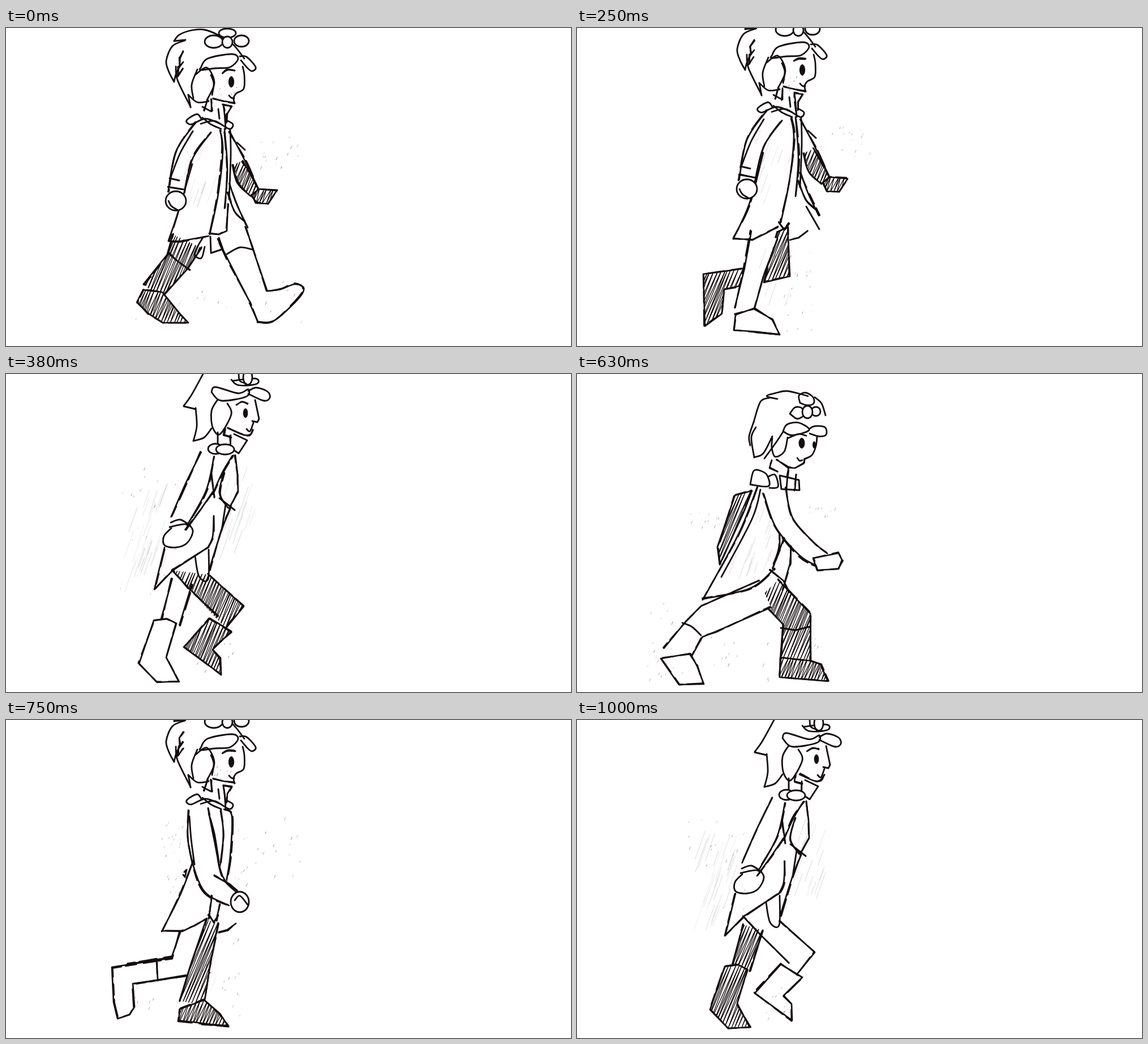
Animation, 998 px wide and 561 px high, one loop 1040 ms. Source, as an HTML page:

```html
<!DOCTYPE html>
<html lang="en">
<head>
<meta charset="utf-8">
<title>Walk cycle sketch</title>
<style>
html, body { margin: 0; width: 100%; height: 100%; overflow: hidden; background: #fff; }
svg { display: block; width: 100vw; height: 100vh; }
path { fill: none; stroke: #140d0e; stroke-linecap: round; stroke-linejoin: round; }
</style>
</head>
<body>
<svg id="stage" viewBox="0 0 998 561"></svg>
<script>
const stage = document.getElementById('stage');
const LOOP = 1040;
let layer, clips = 0, seed = 7;

const rnd = () => (seed = (seed * 16807) % 2147483647) / 2147483647;
const jit = a => (rnd() - .5) * 2 * a;

function add(parent, tag, attrs) {
  const el = document.createElementNS('http://www.w3.org/2000/svg', tag);
  for (const k in attrs) el.setAttribute(k, attrs[k]);
  return parent.appendChild(el);
}

const pairs = n => n.reduce((p, v, i) => (i % 2 ? p[p.length - 1].push(v) : p.push([v]), p), []);
const straight = p => 'M' + p.map(q => q.map(v => v.toFixed(1)).join(' ')).join('L');

function smooth(p) {
  let d = 'M' + p[0];
  for (let i = 0; i < p.length - 1; i++) {
    const a = p[i - 1] || p[i], b = p[i], c = p[i + 1], e = p[i + 2] || c;
    const h1 = b.map((v, k) => v + (c[k] - a[k]) / 6);
    const h2 = c.map((v, k) => v - (e[k] - b[k]) / 6);
    d += `C${h1} ${h2} ${c}`;
  }
  return d;
}

const pen = (d, w, more) => add(layer, 'path', { d, 'stroke-width': w, ...more });
const blank = p => pen(straight(p) + 'Z', 0, { style: 'fill:#fff;stroke:none' });

// a firm line with a broken second pass beside it
function sketch(make, p) {
  pen(make(p), 2.7);
  const beside = p.map(q => q.map(v => v + jit(1.7)));
  pen(make(beside), 2.8, { 'stroke-dasharray': '19 8 31 13', 'stroke-dashoffset': rnd() * 40 });
}

const c = (...n) => pen(smooth(pairs(n)), 2.8);
const l = (...n) => pen(straight(pairs(n)), 2.9);
const bc = (...n) => sketch(smooth, pairs(n));
const bl = (...n) => sketch(straight, pairs(n));

const oval = (x, y, rx, ry) => `M${x - rx} ${y}a${rx} ${ry} 0 1 1 ${2 * rx} 0a${rx} ${ry} 0 1 1 ${-2 * rx} 0`;
const ring = (...n) => pen(oval(...n), 2.8, { style: 'fill:#fff' });
const dot = (...n) => pen(oval(...n), 1, { style: 'fill:#140d0e' });

function hatch(p) {
  const id = 'clip' + clips++, lean = .42;
  add(add(layer, 'clipPath', { id }), 'path', { d: straight(p) + 'Z' });
  const xs = p.map(q => q[0]), ys = p.map(q => q[1]);
  const top = Math.min(...ys), low = Math.max(...ys), run = (low - top) * lean;
  const zig = [];
  for (let x = Math.min(...xs) - run; x < Math.max(...xs); x += 6) {
    zig.push([x + jit(1), low], [x + run + 3 + jit(2), top]);
  }
  pen(straight(zig), 1.3, { 'clip-path': `url(#${id})` });
}

function shape(dark, ...n) {
  const p = pairs(n);
  blank(p);
  if (dark) hatch(p);
  sketch(straight, [...p, p[0]]);
}

// joints as x, y, half width; both sides are drawn, the ends stay open
function limb(dark, make, ...n) {
  const j = [], a = [], b = [];
  for (let i = 0; i < n.length; i += 3) j.push(n.slice(i, i + 3));
  j.forEach(([x, y, w], i) => {
    const p = j[i - 1] || j[i], q = j[i + 1] || j[i];
    const unit = (u, v) => { const s = Math.hypot(u[0] - v[0], u[1] - v[1]) || 1; return [(u[0] - v[0]) / s, (u[1] - v[1]) / s]; };
    const d1 = unit(j[i], p), d2 = unit(q, j[i]);
    const dx = d1[0] + d2[0], dy = d1[1] + d2[1], s = Math.hypot(dx, dy);
    a.push([x - dy / s * w, y + dx / s * w]);
    b.push([x + dy / s * w, y - dx / s * w]);
  });
  const body = [...a, ...b.slice().reverse()];
  blank(body);
  if (dark) hatch(body);
  sketch(make, a);
  sketch(make, b);
}
const leg = (dark, ...n) => limb(dark, straight, ...n);
const arm = (dark, ...n) => limb(dark, smooth, ...n);

// loose marks left on the paper
function specks(x, y, w, h, n) {
  for (let i = 0; i < n; i++) {
    const a = x + rnd() * w, b = y + rnd() * h, s = 1 + rnd() * 4;
    pen(straight([[a, b], [a - s * .4, b + s]]), .8, { 'stroke-opacity': .15 + rnd() * .5 });
  }
}
function shade(x, y, w, h, n) {
  for (let i = 0; i < n; i++) {
    const a = x + rnd() * w, b = y + rnd() * h * .75, s = h * (.12 + rnd() * .2);
    pen(straight([[a, b], [a - s * .35, b + s]]), 1.3, { 'stroke-opacity': .05 + rnd() * .08 });
  }
}

function head() {
  c(297, 23, 306, 12, 328, 4, 350, 3, 372, 11, 400, 28, 421, 54);
  l(297, 23, 317, 21);
  c(316, 22, 294, 32, 283, 58, 288, 78, 297, 95);
  c(297, 94, 301, 79, 308, 66);
  bl(313, 42, 306, 53, 307, 68, 313, 60);
  bl(305, 68, 304, 84, 312, 72);
  c(300, 68, 303, 92, 326, 139);
  l(326, 140, 322, 118);
  c(322, 118, 338, 131, 358, 129);
  c(331, 124, 328, 100, 338, 73);
  c(335, 82, 355, 70, 368, 97, 355, 127);
  ring(391, 9, 15, 8);
  ring(367, 24, 16, 11);
  ring(416, 23, 13, 10);
  ring(391, 25, 9, 10);
  c(344, 70, 356, 54, 398, 46, 410, 54, 396, 69, 370, 71, 344, 74, 344, 70);
  c(413, 50, 425, 51, 441, 69, 434, 76, 425, 69, 415, 57);
  bc(383, 79, 392, 74, 404, 75);
  dot(398, 95, 4.6, 9.5);
  c(418, 68, 421, 83, 420, 107, 407, 115, 402, 124, 404, 133);
  c(394, 119, 398, 123, 403, 124);
  bl(404, 132, 385, 129, 366, 125);
  c(362, 83, 367, 98, 364, 118);
  bl(356, 126, 350, 146);
  l(347, 139, 362, 147);
  bl(363, 127, 363, 147);
  specks(366, 100, 44, 28, 9);
}

function collar() {
  bc(384, 136, 386, 152, 388, 178);
  bl(384, 136, 399, 138, 391, 151, 390, 166);
  c(345, 160, 337, 152, 319, 163, 327, 170, 352, 160, 376, 168);
  c(344, 169, 368, 164, 394, 178, 401, 170, 390, 163);
  c(347, 158, 362, 170, 380, 178);
  l(375, 143, 377, 160);
}

function coatOpen() {
  bc(386, 178, 391, 250, 386, 318);
  bc(378, 180, 383, 215, 375, 292, 360, 364);
  c(396, 180, 397, 225, 394, 302);
  bc(395, 182, 424, 238, 446, 284);
  l(408, 202, 422, 215);
  arm(1, 409, 238, 10, 421, 267, 14, 439, 291, 9);
  shape(1, 434, 294, 441, 309, 463, 310, 478, 287, 447, 284);
  bc(395, 276, 408, 312, 427, 352);
  bc(391, 290, 404, 324, 421, 341);
  arm(0, 349, 175, 16, 315, 224, 16, 300, 292, 14);
  c(330, 182, 308, 220, 291, 263);
  ring(300, 305, 18, 17);
  c(287, 305, 292, 314, 303, 321);
  l(289, 265, 306, 269);
  bl(286, 280, 316, 285);
  shade(320, 190, 60, 150, 12);
  specks(450, 190, 74, 60, 16);
}

function hemPass() {
  bl(276, 372, 311, 373, 334, 362, 355, 350);
  bl(357, 344, 367, 356, 375, 345);
  bl(376, 374, 391, 370, 406, 359);
  shade(325, 370, 55, 130, 8);
  specks(345, 380, 70, 160, 25);
}

function contact() {
  leg(1, 320, 376, 28, 303, 412, 22, 258, 465, 20);
  shape(1, 242, 462, 231, 484, 252, 504, 277, 520, 322, 520, 308, 505, 276, 466);
  bl(287, 398, 303, 411, 324, 427);
  leg(0, 399, 362, 27, 413, 397, 24, 446, 474, 18);
  blank(pairs([430, 485, 461, 464, 520, 458, 474, 516, 445, 518]));
  bc(461, 464, 485, 461, 510, 452, 526, 459, 516, 478, 474, 516, 445, 518);
  bl(430, 485, 445, 518);
  c(390, 399, 413, 387, 436, 391);
  bc(329, 240, 303, 328, 287, 375);
  bl(287, 376, 308, 376, 358, 367);
  bl(360, 362, 376, 364, 390, 358, 392, 310);
  c(348, 369, 333, 398, 345, 406, 351, 386);
  l(361, 368, 362, 397, 383, 390, 376, 370);
  coatOpen(); collar(); head();
  specks(225, 440, 300, 85, 20);
}

function passing() {
  shape(1, 355, 360, 372, 350, 376, 438, 330, 449, 342, 395);
  shape(1, 223, 434, 298, 424, 288, 455, 260, 461, 256, 504, 226, 526);
  leg(0, 331, 365, 24, 313, 430, 18, 295, 498, 17);
  shape(0, 280, 506, 277, 533, 320, 536, 358, 541, 345, 515, 314, 494);
  bl(315, 537, 358, 541);
  bc(329, 220, 304, 311, 276, 372);
  hemPass();
  l(405, 315, 428, 355);
  raised(() => { coatOpen(); collar(); head(); });
}

function cross() {
  leg(1, 371, 372, 19, 415, 438, 20, 455, 490, 18);
  shape(1, 450, 520, 468, 472, 512, 434, 520, 443, 475, 526, 440, 533);
  l(436, 519, 485, 515);
  leg(0, 357, 342, 32, 328, 402, 25, 287, 466, 18);
  shape(0, 250, 446, 240, 478, 222, 500, 259, 541, 322, 542, 284, 495, 296, 465);
  bl(247, 452, 268, 452);
  bc(316, 180, 314, 216, 317, 300, 307, 353);
  bc(325, 178, 323, 235, 313, 340);
  c(320, 184, 328, 225, 324, 288);
  bl(308, 354, 278, 395, 312, 370, 330, 352);
  l(334, 354, 388, 322);
  bc(387, 176, 395, 207, 405, 292);
  bc(396, 184, 397, 230, 403, 270);
  bl(387, 300, 389, 348);
  bl(401, 314, 401, 350);
  arm(0, 344, 178, 14, 362, 228, 17, 374, 272, 18, 404, 312, 13);
  c(336, 190, 342, 220, 352, 256);
  c(352, 283, 380, 309, 410, 328);
  ring(426, 316, 15, 23);
  collar(); head();
  specks(245, 190, 75, 170, 30);
  specks(410, 190, 110, 140, 25);
}

function headLow() {
  c(354, 44, 335, 39, 353, 33, 370, 30, 390, 34, 408, 39);
  c(340, 42, 324, 49, 312, 85);
  c(312, 85, 304, 110, 306, 126);
  c(316, 94, 308, 112, 313, 147);
  c(313, 147, 329, 140, 345, 110);
  c(331, 149, 350, 123, 364, 102);
  c(420, 41, 432, 52, 439, 73);
  c(394, 51, 392, 38, 404, 33, 417, 41, 418, 52, 406, 55, 394, 51);
  c(376, 70, 385, 59, 397, 60, 401, 72, 389, 79, 376, 70);
  ring(422, 66, 8, 8);
  ring(407, 67, 9, 11);
  c(364, 101, 371, 89, 392, 86, 410, 99, 380, 108, 364, 101);
  c(410, 97, 420, 92, 438, 94, 440, 107, 427, 110, 411, 105);
  dot(397, 122, 5, 9);
  dot(419, 125, 2.5, 6);
  c(373, 113, 391, 106, 405, 109);
  c(424, 110, 422, 127, 415, 143, 402, 150);
  c(389, 148, 393, 153, 398, 152);
  bl(403, 149, 400, 158, 385, 166, 372, 165, 353, 151);
  c(345, 113, 344, 130, 350, 146, 366, 137, 372, 112);
  bl(344, 152, 340, 166, 354, 172);
  bl(374, 164, 371, 180);
  c(306, 195, 312, 171, 325, 171, 336, 179, 338, 198, 306, 195);
  c(338, 181, 350, 178, 355, 199, 340, 201);
  l(361, 203, 358, 179, 392, 187, 393, 205, 361, 203);
  l(372, 178, 370, 203);
  bl(387, 177, 385, 204);
}

function low(mirror) {
  leg(!mirror, 338, 380, 24, 388, 432, 26, 386, 505, 27);
  shape(!mirror, 359, 500, 358, 535, 443, 542, 430, 512, 414, 506);
  l(360, 448, 386, 452, 410, 446);
  leg(mirror, 332, 388, 26, 232, 432, 26, 207, 450, 20, 174, 498, 25);
  shape(mirror, 148, 502, 180, 548, 224, 547, 212, 515, 200, 493);
  c(186, 439, 203, 446, 219, 461);
  if (mirror) arm(1, 385, 262, 10, 416, 306, 14, 438, 328, 12);
  else shape(1, 279, 214, 309, 206, 296, 240, 252, 336, 248, 305);
  bc(318, 200, 286, 281, 223, 397);
  c(324, 204, 309, 256, 255, 358);
  bc(223, 397, 306, 378, 349, 343);
  bc(369, 280, 346, 342);
  bc(358, 282, 357, 307, 347, 335);
  bl(379, 300, 376, 335, 363, 381);
  bl(341, 345, 365, 365, 374, 385);
  if (mirror) {
    arm(0, 340, 206, 15, 296, 265, 17, 264, 326, 12);
    ring(262, 341, 14, 15);
    bc(369, 205, 376, 240, 384, 255);
  } else {
    arm(0, 349, 206, 20, 366, 262, 17, 405, 308, 17, 434, 328, 14);
  }
  shape(mirror, 417, 325, 462, 316, 468, 328, 462, 344, 424, 346);
  headLow();
  shade(275, 225, 75, 145, 25);
  specks(200, 240, 70, 75, 16);
  specks(410, 228, 58, 30, 9);
  specks(120, 400, 80, 150, 24);
  specks(215, 460, 240, 80, 24);
}

function passingBack() {
  bl(308, 374, 292, 420, 187, 436, 190, 498, 197, 527, 218, 520, 227, 506, 224, 465, 360, 446);
  bl(214, 431, 294, 418);
  bl(230, 465, 318, 450);
  bl(266, 428, 268, 457);
  leg(1, 364, 355, 11, 343, 435, 17, 328, 500, 22);
  shape(1, 307, 510, 305, 530, 340, 534, 393, 541, 378, 518, 350, 494);
  bl(345, 536, 393, 541);
  hemPass();
  bc(331, 248, 308, 308, 275, 373);
  l(315, 268, 319, 264, 316, 277, 313, 273);
  bc(379, 160, 384, 205, 375, 279);
  bc(386, 158, 399, 170, 396, 240, 389, 286);
  bl(365, 302, 358, 351);
  bl(378, 325, 371, 354);
  arm(0, 340, 158, 17, 345, 215, 23, 365, 287, 21, 402, 317, 13);
  c(324, 170, 327, 210, 333, 255);
  c(358, 165, 368, 200, 376, 250);
  bl(368, 275, 396, 290, 410, 303);
  ring(413, 321, 16, 18);
  c(404, 318, 413, 310, 427, 326);
  raised(() => { collar(); head(); });
  specks(275, 170, 45, 140, 26);
  specks(395, 170, 125, 120, 26);
  specks(225, 460, 45, 50, 10);
}

function headHigh() {
  c(348, 0, 327, 38, 314, 56);
  l(314, 57, 335, 62);
  c(335, 60, 337, 92, 331, 118);
  c(331, 118, 350, 112, 363, 96);
  c(398, 10, 408, 19, 428, 20, 445, 16, 440, 8, 400, 12);
  ring(427, 6, 8, 13);
  c(411, 0, 413, 12, 424, 17);
  c(363, 32, 370, 23, 410, 34, 428, 27, 424, 40, 380, 47, 363, 32);
  c(428, 30, 442, 24, 462, 31, 466, 42, 455, 47, 428, 35);
  c(374, 45, 363, 65, 365, 94, 378, 106, 398, 71, 391, 52);
  bc(408, 54, 417, 49, 427, 52);
  dot(423, 69, 3.8, 8);
  l(440, 46, 447, 79, 444, 85, 435, 83);
  c(425, 97, 431, 101, 437, 86);
  bc(436, 98, 431, 107, 418, 107, 393, 96);
  bl(386, 96, 384, 108, 398, 112);
  l(374, 103, 374, 128);
  bl(397, 108, 396, 132);
  l(403, 106, 426, 117, 411, 140, 402, 134);
  ring(370, 132, 13, 9);
  ring(387, 133, 16, 9);
}

function bodyHigh() {
  bl(405, 143, 409, 177, 410, 208, 394, 237);
  bc(400, 144, 382, 174, 365, 212);
  bc(385, 174, 377, 210, 392, 236);
  l(377, 219, 404, 240);
  bl(359, 150, 368, 218);
  bl(280, 306, 262, 380, 295, 346, 358, 305);
  bc(367, 250, 365, 287, 356, 307);
  bc(396, 238, 381, 275, 359, 345);
  l(388, 230, 381, 276);
  arm(0, 356, 142, 12, 336, 198, 19, 306, 259, 16);
  bl(365, 208, 344, 239, 318, 275);
  c(291, 262, 308, 257, 326, 268);
  c(289, 270, 318, 265, 330, 277, 320, 298, 300, 306, 280, 302, 279, 286, 292, 272);
  headHigh();
  shade(225, 190, 60, 190, 26);
  shade(395, 160, 45, 170, 18);
  specks(195, 160, 110, 240, 20);
}

function high(mirror) {
  leg(!mirror, 311, 366, 18, 290, 438, 17);
  shape(!mirror, 261, 435, 285, 432, 301, 440, 283, 500, 305, 542, 267, 544, 235, 511);
  shape(mirror, 360, 431, 314, 482, 380, 530, 379, 501, 365, 486, 398, 454);
  if (mirror) hatch(pairs([293, 346, 358, 354, 420, 410, 388, 449]));
  bl(293, 346, 321, 376, 374, 428);
  bl(358, 354, 420, 410, 388, 449);
  c(334, 322, 341, 357, 357, 362, 358, 310);
  bodyHigh();
  specks(330, 470, 75, 60, 14);
}

function swing() {
  leg(1, 311, 366, 18, 282, 470, 20);
  shape(1, 261, 470, 252, 511, 280, 540, 326, 540, 300, 498, 302, 470);
  bl(293, 346, 360, 432, 292, 454, 279, 490, 288, 521, 309, 510, 319, 479, 337, 456, 406, 414, 358, 352);
  bodyHigh();
}

function within(dx, dy, paint) {
  const outer = layer;
  layer = add(outer, 'g', { transform: `translate(${dx} ${dy})` });
  paint();
  layer = outer;
}
const raised = paint => within(0, -21, paint);

const walk = [
  [0, contact],
  [130, () => low(true)],
  [250, passing],
  [380, () => high(true)],
  [500, cross],
  [630, () => low(false)],
  [750, passingBack],
  [880, () => within(-10, 2, swing)],
  [1000, () => high(false)]
];

const poses = walk.map(([start, paint]) => {
  const pose = layer = add(stage, 'g', {});
  seed = 41;
  paint();
  return { start, pose };
});

let shown = -1;
function tick() {
  const t = performance.now() % LOOP;
  const now = poses.filter(p => p.start <= t).length - 1;
  if (now !== shown) poses.forEach((p, i) => p.pose.setAttribute('visibility', i === now ? 'visible' : 'hidden'));
  shown = now;
  requestAnimationFrame(tick);
}
tick();
</script>
</body>
</html>
```
